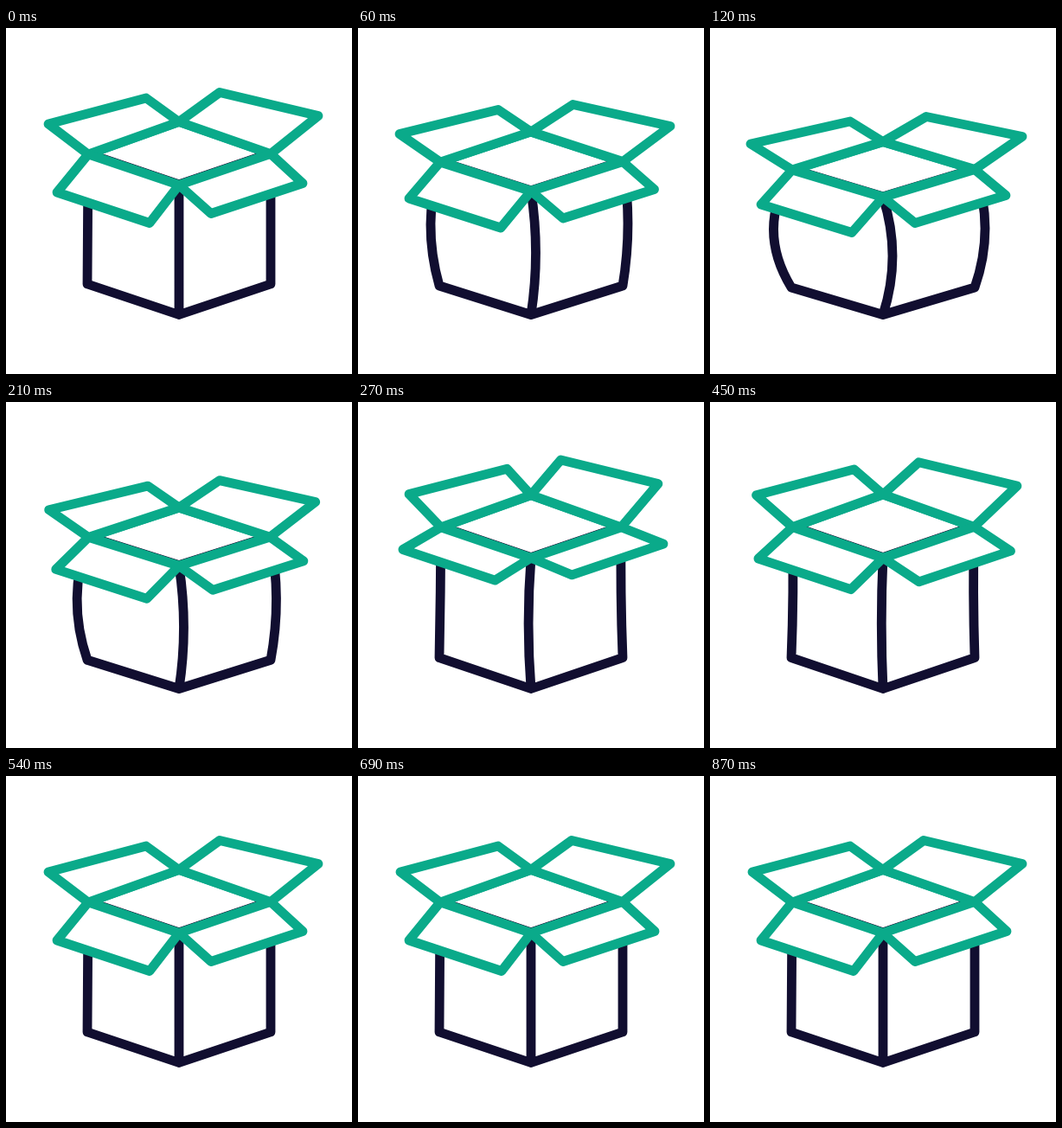
An HTML page that plays this animation: 400 px wide and 400 px high, repeating every 2.9 s.

```html
<!DOCTYPE html>
<html lang="en">
<head>
<meta charset="utf-8">
<title>Open box</title>
<style>
  html, body { margin: 0; height: 100%; overflow: hidden; background: #fff; }
  svg { display: block; width: 100%; height: 100%; }
  path { stroke-width: 10.8; stroke-linecap: round; stroke-linejoin: round; }
  #body { fill: none; stroke: #110e30; }
  #rim, .flap { fill: #fff; stroke: #0aaa8a; }
  #rim { fill: none; }
</style>
</head>
<body>
<svg viewBox="0 0 400 400">
  <path id="body"/>
  <path id="rim"/>
  <path class="flap"/><path class="flap"/><path class="flap"/><path class="flap"/>
</svg>
<script>
const LOOP = 2900, STEP = 30;

// Each value is [rest, squashed, stretched]; points are [x..., y...].
const RIM = {
  left:  [[95, 95, 96], [146, 164, 142]],
  back:  [[200, 200, 200], [108.5, 131.5, 104]],
  right: [[306, 306, 304], [145.5, 163.5, 142]],
  front: [[200, 200, 200], [181.5, 195.5, 178]]
};

// Flap tips are measured from the rim corners they hang on.
const FLAPS = [
  ['left', 'back',   [[-46, -48, -34], [-35, -30, -40.5]], [[-38, -38, -25], [-27.5, -23.5, -32]]],
  ['back', 'right',  [[47, 50, 30.5], [-34, -29, -43.5]],  [[55, 55, 39.5], [-44, -38, -53.5]]],
  ['left', 'front',  [[-36, -36, -46], [44, 40, 22]],      [[-34, -36, -43], [44, 41, 22]]],
  ['front', 'right', [[37, 37, 50], [33, 30, 17]],         [[37, 36, 52], [34, 30, 16.5]]]
];

const BASE_Y = [296, 300, 295];
const BULGE = { left: [0, -21, 3.5], front: [0, 11, -5], right: [0, 12, -3] };

const rimPath = document.getElementById('rim');
const bodyPath = document.getElementById('body');
const flapPaths = document.querySelectorAll('.flap');

function ease(u) {
  u = Math.min(1, Math.max(0, u));
  return u < .5 ? (2 * u) ** 2.4 / 2 : 1 - (2 - 2 * u) ** 2.4 / 2;
}

// Weights of the three poses; the squash is held until `release`.
function weights(t, release) {
  const squash = ease(t / 120), rise = ease((t - release) / (330 - release));
  const settle = ease((t - 330) / 210);
  return [1 - squash + settle, squash - rise, rise - settle];
}

const mix = (values, w) => values.reduce((sum, v, i) => sum + v * w[i], 0);
const point = (p, w) => p.map(values => mix(values, w));
const add = (a, b) => [a[0] + b[0], a[1] + b[1]];
const poly = pts => 'M' + pts.map(p => p.join(' ')).join('L');

function side(top, bottom, bulge) {
  const x = (top[0] + bottom[0]) / 2 + 2 * bulge, y = (top[1] + bottom[1]) / 2;
  return `${poly([top])}Q${x} ${y} ${bottom.join(' ')}`;
}

function draw(t) {
  const w = weights(t, 120), flapW = weights(t, 155);
  const rim = {};
  for (const name in RIM) rim[name] = point(RIM[name], w);

  const baseY = mix(BASE_Y, w);
  const base = { left: [94, baseY], front: [200, 331.5], right: [306, baseY] };
  const names = Object.keys(base);
  const inner = names.map(n => add(rim[n], [0, -.7]));
  bodyPath.setAttribute('d', poly(inner) + poly(Object.values(base)) +
    names.map(n => side(rim[n], base[n], mix(BULGE[n], w))).join(''));

  rimPath.setAttribute('d', poly(Object.values(rim)) + 'Z');
  FLAPS.forEach(([a, b, tipA, tipB], i) => {
    const tips = [add(rim[a], point(tipA, flapW)), add(rim[b], point(tipB, flapW))];
    flapPaths[i].setAttribute('d', poly([rim[a], ...tips, rim[b]]) + 'Z');
  });
}

const start = performance.now();
function frame() {
  const t = (performance.now() - start) % LOOP;
  draw(Math.floor(t / STEP) * STEP);
  requestAnimationFrame(frame);
}
frame();
</script>
</body>
</html>
```
